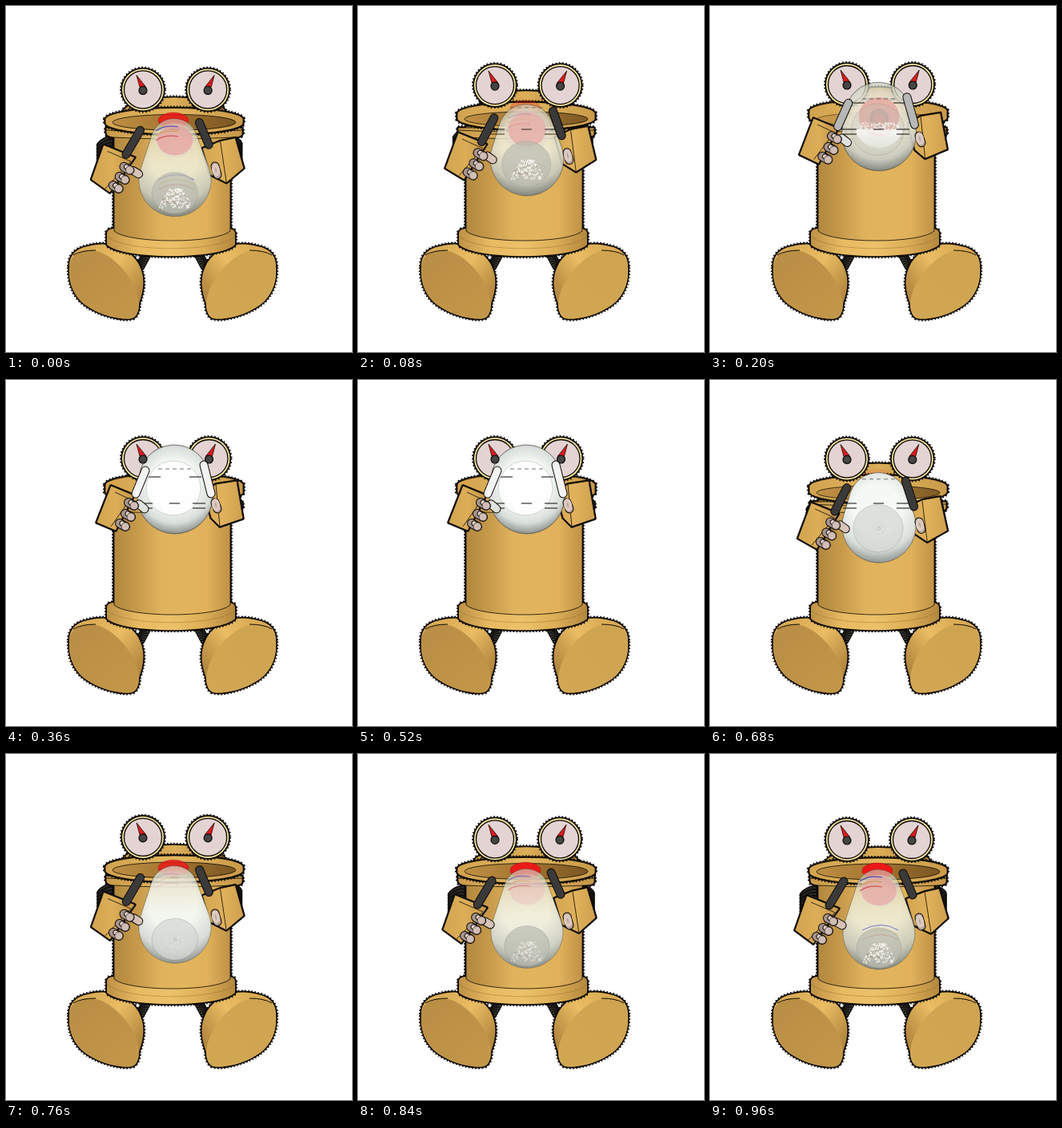
An HTML page with a canvas for the animation above (1 s loop, 432 by 432 pixels).

```html
<!DOCTYPE html>
<html>
<head>
<meta charset="utf-8">
<style>
html, body { margin: 0; width: 100%; height: 100%; overflow: hidden; background: #fff }
canvas { display: block; width: 432px; height: 432px }
</style>
</head>
<body>
<canvas id="c" width="432" height="432"></canvas>
<script>
const g = document.getElementById('c').getContext('2d');
const INK = '#0c0905', TAU = Math.PI * 2;

// time in ms -> value pairs
const LIFT = [[0, .08], [100, .5], [200, .82], [280, .95], [360, 1], [560, 1], [620, .84], [680, .53], [760, .1], [840, .02], [960, 0], [1000, .08]];
const MILK = [[0, .08], [120, .12], [200, .25], [280, .75], [360, 1], [680, 1], [760, .9], [840, .5], [960, .15], [1000, .08]];

let p = 0, milk = 0, seed = 1;
const mix = (a, b) => a + (b - a) * p;
const mixPts = (a, b) => a.map((q, i) => [mix(q[0], b[i][0]), mix(q[1], b[i][1])]);
const clamp = x => Math.max(0, Math.min(1, x));
const rnd = () => (seed = seed * 16807 % 2147483647) / 2147483647;

function track(keys, t) {
  const i = keys.findIndex(k => k[0] > t), [t0, a] = keys[i - 1], [t1, b] = keys[i];
  return a + (b - a) * (t - t0) / (t1 - t0);
}
function line(path, width = .8, color = INK) {
  g.lineWidth = width;
  g.strokeStyle = color;
  g.stroke(path);
}
function fill(path, color) {
  g.fillStyle = color;
  g.fill(path);
}
function paint(path, color, width = .8, ink = INK) {
  fill(path, color);
  line(path, width, ink);
}
// rough silhouette outline
function edge(path) {
  line(path, 3.6);
  g.setLineDash([1.5, 2.5]);
  line(path, 6);
  g.setLineDash([]);
}
function oval(x, y, rx, ry = rx, rot = 0) {
  const o = new Path2D();
  o.ellipse(x, y, rx, ry, rot, 0, TAU);
  return o;
}
function poly(pts, closed = true) {
  const o = new Path2D();
  pts.forEach(q => o.lineTo(...q));
  if (closed) o.closePath();
  return o;
}
function fade(x0, y0, x1, y1, ...stops) {
  const f = g.createLinearGradient(x0, y0, x1, y1);
  stops.forEach((s, i) => f.addColorStop(i / (stops.length - 1), s));
  return f;
}
function capsule(x0, y0, x1, y1, w, color) {
  g.lineCap = 'round';
  const o = poly([[x0, y0], [x1, y1]], false);
  line(o, w + 2);
  line(o, w, color);
  g.lineCap = 'butt';
}

function foot(dark, light) {
  for (let i = 0; i < 8; i++) paint(oval(176 - i * 1.6, 309 + i * 3, 9, 3, -.5), '#444', 1.2);
  const sole = 'C166 382 162 389 157 390C140 393 108 383 93 368C82 356 78 343 79 325Z';
  const shoe = new Path2D('M79 325C79 311 87 303 102 300C125 293 152 300 165 321C174 338 173 352 166 372' + sole);
  edge(shoe);
  fill(shoe, fade(100, 300, 172, 350, '#d9aa54', '#eabc63', '#b58940'));
  fill(new Path2D('M79 325C80 312 90 306 108 305C135 308 165 345 166 372' + sole), fade(90, 310, 155, 388, dark, light));
  line(new Path2D('M84 311Q94 305 112 305'), 1);
}
function mirrored(draw) {
  g.save();
  g.translate(416, 0);
  g.scale(-1, 1);
  draw();
  g.restore();
}

function trunk() {
  const base = new Path2D('M126 283Q127 278 136 278H279Q286 279 286 284V298C268 317 145 317 126 298Z');
  const tube = new Path2D('M135 150H280V281C262 297 153 297 135 281Z');
  const ring = new Path2D('M125 152H295V158Q296 164 284 164Q209 168 134 164Q125 163 125 158Z');
  [base, tube, ring].forEach(edge);
  fill(base, fade(125, 0, 287, 0, '#bd9045', '#e8ba61', '#edc16a', '#dcae57', '#b3863d'));
  line(new Path2D('M126 287C144 308 269 308 286 287'), .4, '#8a652d');
  paint(tube, fade(135, 0, 280, 0, '#b1883f', '#c79a4b', '#e0b25c', '#e2b45d', '#e0b15a', '#bf9247'));
  paint(ring, fade(125, 0, 295, 0, '#c99b4b', '#e6b961', '#c69749'));
  line(new Path2D('M125 155Q210 160 295 155'));
}

function lid() {
  const y = 131 + 13 * (1 - p) ** 2.5, thick = 4 + 5 * p;
  const dome = oval(210, y - 7, mix(66, 50), 20 + 3 * p);
  edge(dome);
  fill(dome, fade(145, 0, 275, 0, '#c99a48', '#dcae58', '#b78a40'));
  const rim = new Path2D();
  rim.ellipse(210, y, 86, 14, 0, Math.PI, TAU);
  rim.ellipse(210, y + thick, 86, 14, 0, 0, Math.PI);
  rim.closePath();
  edge(rim);
  paint(rim, fade(124, 0, 296, 0, '#d2a34f', '#e3b65f', '#c99a49'));
  g.globalAlpha = 1 - p ** 4;
  paint(oval(210, mix(y + 3, y + 12), 77, mix(10, 8)), fade(135, 0, 285, 0, '#bd8e43', '#a3742f', '#7c5723'));
  g.globalAlpha = 1;
}

function dial(x, y) {
  const rim = oval(x, y, 26);
  edge(rim);
  fill(rim, '#f2e3a0');
  paint(oval(x, y, 23.5), '#e3d4d3', 1.3);
}
function needle(x, y, side) {
  paint(poly([[x - 4, y - 3], [x + side * 8, y - 18], [x + 4, y - 3]]), '#e21a1c');
  paint(oval(x, y + 1, 5), '#454545', 1.2);
}

function jar() {
  const top = 137 - 36 * p - 20 * p * p, low = 269 - 77 * p;
  const r = mix(28, 44), R = mix(45, 47), cx = 211, y0 = top + r + 7 * (1 - p), y1 = low - R;
  const a = Math.asin(clamp((R - r) / (y1 - y0)));
  const glass = new Path2D();
  glass.arc(cx - 1, y0, r, Math.PI + a, TAU - a);
  glass.arc(cx, y1, R, -a, Math.PI + a);
  glass.closePath();

  const early = clamp(1 - p * 1.7), clear = 1 - milk, tipped = p > .5;
  g.globalAlpha = early;
  paint(oval(209, top + 9, 19, 10), '#ef1717', .5, '#9a1010');
  g.globalAlpha = 1;

  g.save();
  g.clip(glass);
  fill(glass, fade(0, top, 0, low, 'rgba(222,224,200,.55)', `rgba(240,241,${mix(222, 228)},.82)`, 'rgba(212,215,207,.92)'));

  // red cap seen through the glass
  const capY = 171 - 40 * p;
  g.globalAlpha = clear;
  fill(oval(cx, capY, mix(24, 37), mix(20, 37)), 'rgba(227,213,203,.6)');
  fill(oval(cx, capY, mix(22, 26), mix(18, 26)), tipped ? '#e0857c' : '#e6aaa3');
  if (tipped) {
    fill(oval(cx, capY + 2, 12), '#a98580');
    fill(oval(cx, capY + 3, 8), '#d98a82');
  }

  // coloured label strokes
  g.globalAlpha = early * (.35 + .65 * clear);
  ['#3939b5', '#c99b45', '#c93e43'].forEach((c, i) => {
    const y = top + 17 + i * 6;
    line(new Path2D(`M187 ${y + 5}Q198 ${y - 3} 215 ${y}`), 1.2, c);
    if (milk < .5) line(new Path2D(`M190 ${y + 66}Q214 ${y + 53} 235 ${y + 66}`), .9, c);
  });

  // milk, denser toward the bottom while the jar is low
  const upper = milk * clamp(.15 + p * 2.2);
  g.globalAlpha = 1;
  fill(glass, fade(0, top + 10, 0, y1 - 10, `rgba(244,249,245,${upper})`, `rgba(244,249,245,${milk})`));
  const sy = y1 - mix(30, 14), shade = g.createRadialGradient(cx - 2, sy, 30, cx, sy, mix(78, 62));
  shade.addColorStop(0, 'rgba(75,82,76,0)');
  shade.addColorStop(.55, 'rgba(75,82,76,.16)');
  shade.addColorStop(1, 'rgba(65,70,66,.62)');
  fill(glass, shade);

  // base of the jar
  const dy = low - 27 - 30 * p, base = oval(cx - 2 * p, dy, mix(28, 34), mix(25, 34));
  g.globalAlpha = p > .7 ? .1 + .7 * milk : .7;
  fill(base, milk > .5 ? (p > .7 ? '#fff' : '#d3d7d2') : '#bbbdb1');
  g.globalAlpha = .5;
  line(base, .7, '#8f928b');
  if (milk > .8 && p < .7) {
    line(oval(cx, dy, 2), .8, '#999');
    line(oval(cx, dy, 7), .5, '#bbb');
  }

  // loose grains and the drift they settle into
  seed = 77;
  const gy = tipped ? capY + 16 : dy + 3;
  g.globalAlpha = clear;
  if (tipped) {
    g.save();
    g.clip(oval(cx, capY + 8, 31));
    g.fillStyle = fade(0, gy, 0, gy + 24, '#fff', '#e4e7e2');
    g.fillRect(170, gy, 80, 40);
    g.restore();
  }
  for (let i = 0; i < 150; i++) {
    const v = rnd(), x = cx + (rnd() - .5) * (tipped ? 48 : 16 + 28 * v);
    g.fillStyle = i % 9 || tipped ? '#f6f6f2' : '#a98a70';
    g.fillRect(x, gy - 9 + v * (tipped ? 13 : 24), 1.7, 1.7);
  }
  g.restore();
  line(glass, .8, `rgba(60,62,56,${mix(.5, .9)})`);

  // slots of the mouth
  g.globalAlpha = clamp(p * 2);
  line(new Path2D('M164 154H183M233 154H249M166 160H183M233 160H249M204 154H217'), 1);
  if (p > .7) line(new Path2D('M178 121H193M229 121H244'), 1);
  g.setLineDash([5, 4]);
  line(new Path2D(`M190 ${mix(138, 111)}H233`), .8, '#555');
  g.setLineDash([]);
  g.globalAlpha = 1;
}

function arms() {
  for (let i = 0; i < 7; i++) {
    paint(oval(mix(123, 138), mix(172, 144) + i * 4, 12, 5, -.5), '#292929', 1.5);
    paint(oval(mix(287, 282), mix(172, 141) + i * 3, 9, 5, .5), '#292929', 1.5);
  }
}

function cuffs() {
  const left = mixPts([[121, 177], [161, 193], [129, 237], [106, 220]], [[131, 132], [160, 144], [137, 188], [113, 178]]);
  const right = mixPts([[245, 181], [268, 172], [286, 168], [297, 205], [276, 224], [255, 214]],
                       [[248, 140], [262, 130], [288, 126], [296, 173], [267, 183], [256, 172]]);
  const box = poly(left), block = poly(right);
  line(box, 3.6);
  paint(box, fade(left[3][0], 0, left[1][0], 0, '#d3a450', '#dcae58', '#c4964a'));
  const [q0, q1, q2] = left;
  line(poly([[q0[0] + 5, q0[1] + 8], [q1[0] - 5, q1[1] + 5], [q2[0] - 6, q2[1] - 5]], false));
  line(block, 3.6);
  paint(block, fade(245, 0, 297, 0, '#d4a550', '#dfb15a', '#bb8c42'));
  paint(poly(right.slice(1, 5)), 'rgba(225,180,92,.5)');
}

function fingers() {
  const tone = Math.round(58 + 185 * clamp((p - .55) / .4)), stick = `rgb(${tone},${tone},${tone})`;
  capsule(mix(167, 174), mix(159, 113), mix(149, 162), mix(189, 142), 9, stick);
  capsule(mix(241, 247), mix(149, 106), mix(253, 256), mix(176, 142), 9, stick);
  capsule(mix(158, 166), mix(210, 155), mix(165, 173), mix(214, 161), 9, p > .7 ? '#dfe2df' : '#d7c2b8');
  mixPts([[154, 209], [148, 221], [140, 232]], [[160, 157], [156, 171], [149, 183]]).forEach(([x, y]) => {
    capsule(x - 7, y - 4, x, y, 10, '#a8948e');
    capsule(x - 4, y - 4, x, y - 1, 5, '#e3d2cb');
    paint(oval(x, y, 5), '#d0bdb6', .6);
  });
  capsule(mix(261, 261), mix(204, 153), mix(264, 264), mix(215, 161), 9, '#b7a29a');
  line(oval(mix(262, 262), mix(209, 156), 3, 6, -.2), 4, '#dccac2');
}

function frame(now) {
  const t = Math.floor(now % 1000 / 40) * 40;
  p = track(LIFT, t);
  milk = track(MILK, t);
  g.fillStyle = '#fff';
  g.fillRect(0, 0, 432, 432);
  g.lineJoin = 'round';
  foot('#b98e45', '#c39749');
  mirrored(() => foot('#cfa451', '#d2a753'));
  arms();
  trunk();
  lid();
  const y = 98 + 9 * (1 - p) ** 4, right = mix(252, 253.5);
  dial(171, y);
  dial(right, y);
  cuffs();
  jar();
  needle(171, y, -1);
  needle(right, y, 1);
  fingers();
  requestAnimationFrame(frame);
}
frame(0);
</script>
</body>
</html>
```
